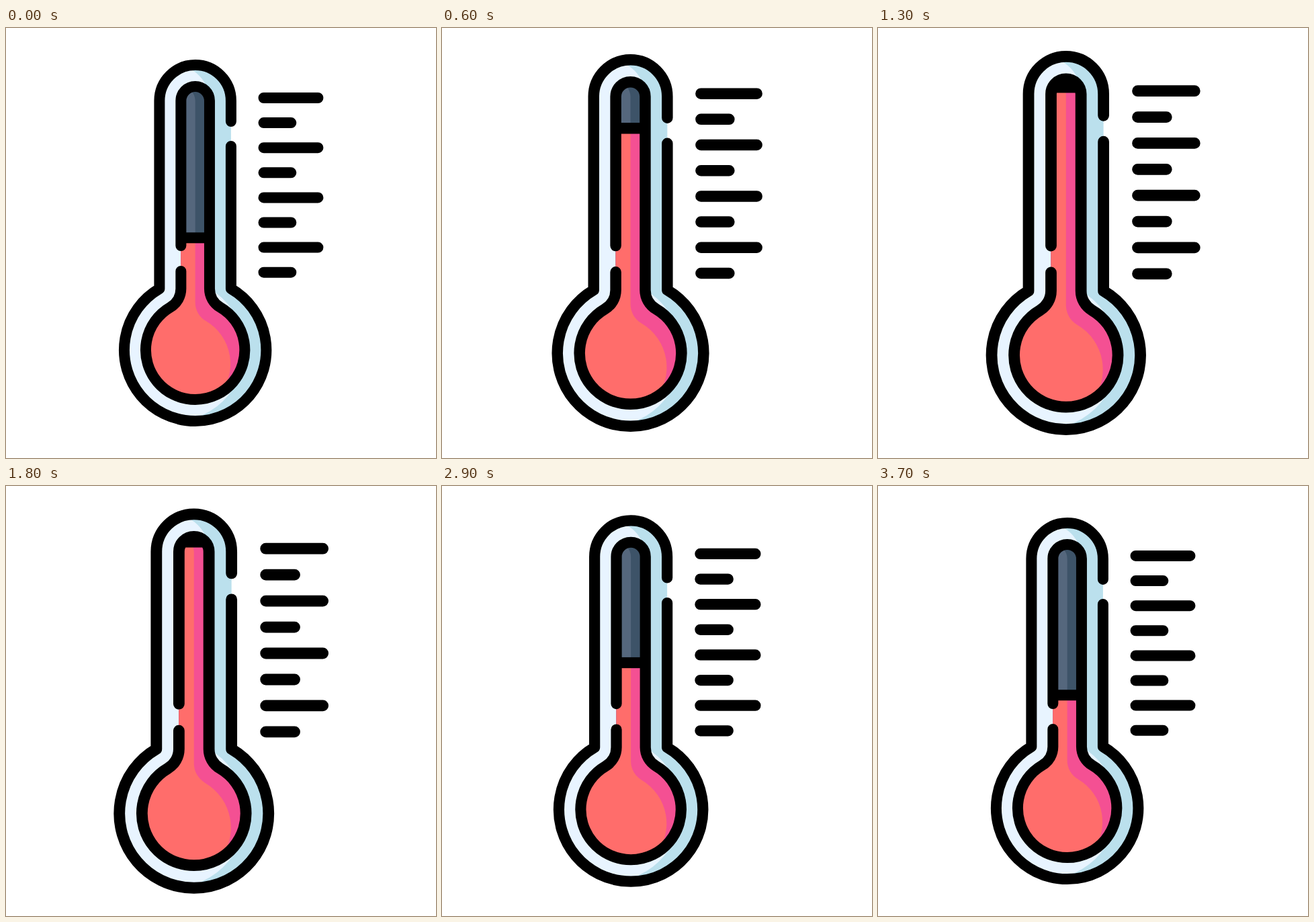
An HTML page that plays this animation: 640 px wide and 640 px high, repeating every 3.8 s.

```html
<!DOCTYPE html>
<html lang="en">
<head>
<meta charset="utf-8">
<title>Thermometer</title>
<style>
html, body { margin: 0; width: 100%; height: 100%; overflow: hidden; background: #fff; }
svg { display: block; width: 100vw; height: 100vh; }
.line { fill: none; stroke: #000; stroke-width: 16; stroke-linecap: round; stroke-linejoin: round; }
</style>
</head>
<body>
<svg viewBox="0 0 640 640">
  <defs>
    <clipPath id="glassClip"><path id="glassShape"/></clipPath>
    <clipPath id="boreClip"><path id="boreShape"/></clipPath>
    <clipPath id="liquidClip"><rect id="liquid" x="160" width="240" height="600"/></clipPath>
  </defs>
  <g id="icon">
    <g clip-path="url(#glassClip)">
      <rect width="640" height="640" fill="#bbe0ed"/>
      <path id="glassLight" fill="#e8f4ff"/>
    </g>
    <g clip-path="url(#boreClip)">
      <rect width="640" height="640" fill="#3d5368"/>
      <path class="boreLight" fill="#55677d"/>
      <g clip-path="url(#liquidClip)">
        <rect width="640" height="640" fill="#f45093"/>
        <path class="boreLight" fill="#ff6d6b"/>
      </g>
    </g>
    <path id="surface" d="M266 0H297.3" stroke="#000" stroke-width="16"/>
    <path id="glassLine" class="line"/>
    <path id="boreLine" class="line"/>
    <path id="marks" class="line"/>
  </g>
</svg>
<script>
const $ = id => document.getElementById(id);
const CX = 281.65, TOP = 108.3, NECK = 388;

// Both outlines run from the right side to the left; start and end may leave a gap.
function glass(x, start, end) {
  const l = x - 53.25, r = x + 53.25;
  return `M${r} ${start}V${TOP}A53.25 53.25 0 0 0 ${l} ${TOP}V${NECK}` +
    `A105.7 105.7 0 1 0 ${r} ${NECK}V${end}`;
}

function bore(x, dy, start, end) {
  const l = x - 21.3, r = x + 21.3, neck = NECK + dy, join = neck + 27.6;
  return `M${l} ${start}V${TOP}A21.3 21.3 0 0 1 ${r} ${TOP}V${neck}` +
    `A32 32 0 0 0 ${x + 37.1} ${join}A73.7 73.7 0 1 1 ${x - 37.1} ${join}` +
    `A32 32 0 0 0 ${l} ${neck}V${end}`;
}

const setPath = (el, d) => el.setAttribute("d", d);
setPath($("glassShape"), glass(CX, TOP, TOP));
setPath($("glassLight"), glass(CX - 32, TOP, TOP));
setPath($("glassLine"), glass(CX, 139, 176));
setPath($("boreShape"), bore(CX, 0, TOP, TOP));
setPath($("boreLine"), bore(CX, 0, 324, 362));
for (const el of document.querySelectorAll(".boreLight"))
  setPath(el, bore(CX - 21.3, 20.5, TOP, TOP));

let marks = "";
for (let i = 0; i < 8; i++)
  marks += `M383.5 ${104 + i * 37.1}H${i % 2 ? 424.3 : 464.4}`;
setPath($("marks"), marks);

// Cubic Bezier easing with handles (1/3, 0) and (b, 1).
function ease(u, b) {
  if (u <= 0) return 0;
  if (u >= 1) return 1;
  let lo = 0, hi = 1;
  for (let i = 0; i < 30; i++) {
    const s = (lo + hi) / 2, q = 1 - s;
    if (s * q * q + 3 * b * s * s * q + s * s * s < u) lo = s; else hi = s;
  }
  return lo * lo * (3 - 2 * lo);
}

const LOOP = 3800, STEP = 100, FALL = 2233;
const progress = (t, rise, fall, b) =>
  t < FALL ? ease(t / rise, b) : 1 - ease((t - FALL) / fall, b);

function draw(now) {
  const t = Math.floor(now % LOOP / STEP) * STEP;
  const scale = 1 + 0.05 * progress(t, 1850, 1667, 0.1);
  const level = 312.3 - 217.9 * progress(t, 1667, 1667, 0);
  $("icon").setAttribute("transform", `translate(320 320) scale(${scale}) translate(-320 -320)`);
  $("liquid").setAttribute("y", level);
  $("surface").setAttribute("transform", `translate(0 ${level})`);
}

const begin = performance.now();
function tick() {
  draw(performance.now() - begin);
  requestAnimationFrame(tick);
}
tick();
</script>
</body>
</html>
```
